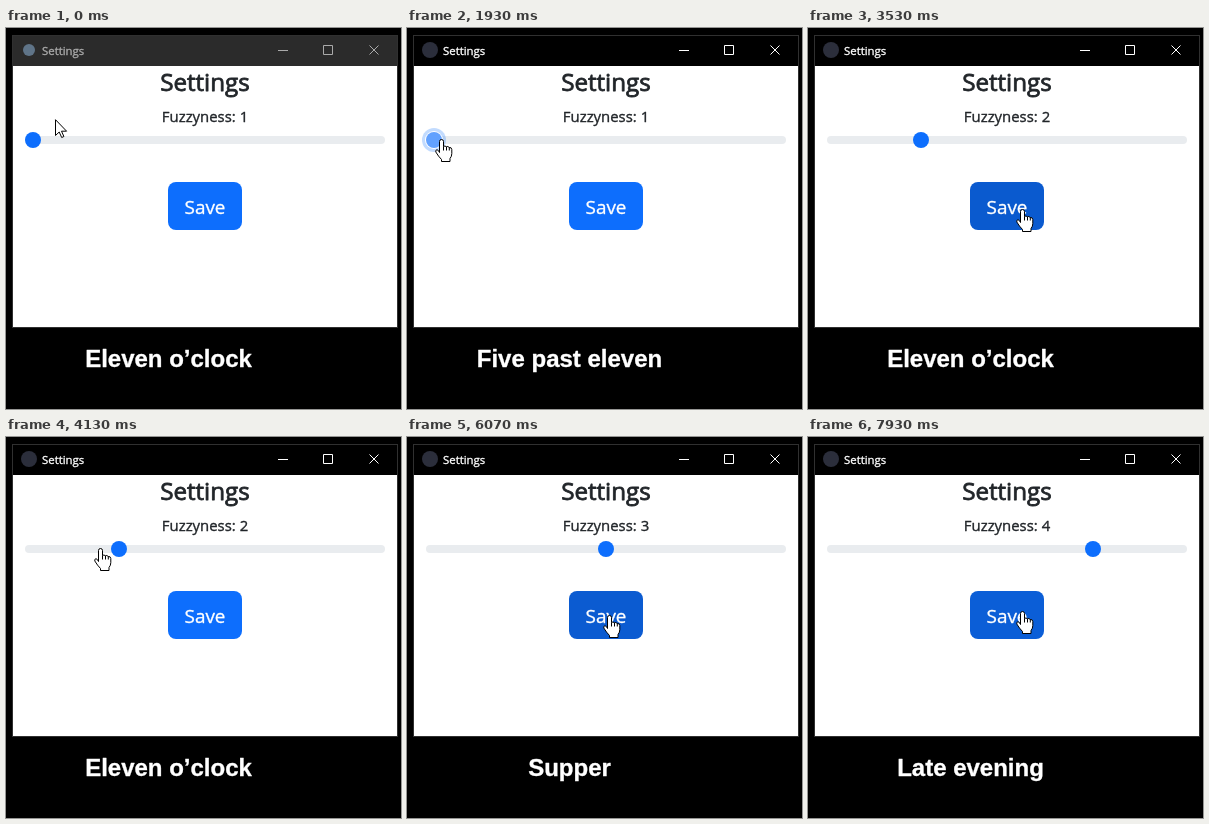
Write an HTML page with a canvas that moves like this. It is 395x381 px and loops after 8000 ms.

```html
<!DOCTYPE html>
<html lang="en">
<head>
<meta charset="utf-8">
<title>Settings</title>
<style>
html, body { margin: 0; width: 100%; height: 100%; overflow: hidden; background: #000; }
canvas { display: block; }
</style>
</head>
<body>
<canvas width="395" height="381"></canvas>
<script>
const ctx = document.querySelector('canvas').getContext('2d');
const LOOP = 8000, FPS = 15, FADE = 150, PRESS = 100;
const UI = '"Open Sans", "Noto Sans", sans-serif';
const CLOCK = '"Liberation Sans", Arial, sans-serif';
const BLUE = [13, 110, 253], HOVER = [11, 94, 215], PRESSED = [10, 88, 202], HELD = [182, 212, 254];

// Each round drags the thumb one level up, then clicks Save for a new phrase.
const rounds = [
  { start: 1870, from: [34, 111], drop: 2660, to: [94, 116], release: 2870,
    save: 3400, at: [214, 181], click: 3500, phrase: 'Eleven o’clock' },
  { start: 4200, from: [94, 111], drop: 5080, to: [161, 111], release: 5230,
    save: 5660, at: [202, 178], click: 6000, phrase: 'Supper' },
  { start: 6700, from: [199, 112], drop: 7100, to: [252, 112], release: 7130,
    save: 7500, at: [214, 174], click: 7700, phrase: 'Late evening' }
];

const smooth = u => u * u * (3 - 2 * u);
const speedUp = u => u * u;
const key = (t, [x, y], ease = smooth) => ({ t, x, y, ease });
const path = [
  key(0, [49, 91]), key(330, [11, 104]), key(870, [125, 146]), key(1270, [48, 108]),
  ...rounds.flatMap(r => [
    key(r.start - 70, r.from), key(r.start, r.from),
    key(r.drop, r.to, speedUp), key(r.release, r.to),
    key(r.save, r.at), key(r.click + 150, r.at)
  ])
];

function pointerAt(t) {
  const i = path.findIndex(p => p.t > t);
  if (i < 1) return i ? path[path.length - 1] : path[0];
  const a = path[i - 1], b = path[i], k = b.ease((t - a.t) / (b.t - a.t));
  return { x: Math.round(a.x + (b.x - a.x) * k), y: Math.round(a.y + (b.y - a.y) * k) };
}

const thumbX = level => 27 + 86 * (level - 1);
const levelAt = t => 1 + rounds.filter((r, i) =>
  t >= r.drop || t >= r.start && pointerAt(t).x > thumbX(i + 1) + 43).length;
const grabbed = (t, end) => rounds.some((r, i) =>
  t >= r.start && t < end(r) && pointerAt(t).x > thumbX(i + 1) - 8);
const isHeld = t => grabbed(t, r => r.release);
const isFocused = t => grabbed(t, r => r.click - PRESS);
const isPressed = t => rounds.some(r => t >= r.click - PRESS && t < r.click);

const inside = (p, x, y, w, h) => p.x >= x && p.x < x + w && p.y >= y && p.y < y + h;
const SAVE = [162, 154, 74, 48], TRACK = [19, 108, 360, 8];
const onSave = t => inside(pointerAt(t), ...SAVE);

function phraseAt(t) {
  const done = rounds.filter(r => t >= r.click).pop();
  return done ? done.phrase : t < 460 ? 'Eleven o’clock' : 'Five past eleven';
}

// Share of the last moments in which a state held: a linear colour transition
function fade(state, t) {
  const samples = 10;
  let sum = 0;
  for (let i = 0; i < samples; i++) sum += state(t - i * FADE / samples);
  return sum / samples;
}
const mix = (a, b, k) => a.map((v, i) => Math.round(v + (b[i] - v) * k));
const rgb = c => `rgb(${c})`;

function box(x, y, w, h, fill, r = 0) {
  ctx.fillStyle = fill;
  ctx.beginPath();
  ctx.roundRect(x, y, w, h, r);
  ctx.fill();
}
const disc = (x, y, r, fill) => box(x - r, y - r, 2 * r, 2 * r, fill, r);

function text(str, x, y, font, fill, align = 'center', extra = 0.35) {
  ctx.font = font;
  ctx.fillStyle = ctx.strokeStyle = fill;
  ctx.textAlign = align;
  ctx.lineWidth = extra;
  ctx.lineJoin = 'round';
  ctx.fillText(str, x, y);
  ctx.strokeText(str, x, y);
}

const arrow = new Path2D('M.5 .7V16.5L4.2 13L6.7 18.5L8.9 17.5L6.5 12.2H11.6Z');
const hand = new Path2D('M4.5 13.5V2.5Q4.5 .5 6.5 .5T8.5 2.5V7.5Q10 6.3 11.4 7.8Q13 6.8 14.2 8.5' +
  'Q16.6 8.1 16.8 10.5V14.5Q16.8 17.5 15 19.5V22.5H6.5V20.5Q3.5 17.5 .8 13Q.3 11 2 10.7Q3.5 11 4.5 13.5Z');
const knuckles = new Path2D('M8.5 7.5V11.5M11.5 7.8V11.5M14.3 8.5V11.5');
const controls = new Path2D('M272 22.5H282M317.5 17.5H326.5V26.5H317.5Z' +
  'M363.5 17.5L372.5 26.5M372.5 17.5L363.5 26.5');

function stroke(shape, color) {
  ctx.strokeStyle = color;
  ctx.lineWidth = 1;
  ctx.lineJoin = 'miter';
  ctx.stroke(shape);
}

function drawPointer({ x, y }, isHand) {
  const shape = isHand ? hand : arrow;
  ctx.save();
  ctx.translate(isHand ? x - 6 : x, y);
  ctx.fillStyle = '#fff';
  ctx.fill(shape);
  stroke(shape, '#000');
  if (isHand) stroke(knuckles, '#000');
  ctx.restore();
}

function drawWindow(active) {
  const ink = active ? '#fff' : '#aaa';
  box(0, 0, 395, 381, '#000');
  box(6, 7, 386, 293, '#303030');
  box(7, 8, 384, 30, active ? '#000' : '#2b2b2b');
  box(7, 38, 384, 261, '#fff');
  disc(23, 22, active ? 8 : 6, active ? '#2b2e3b' : '#5f7488');
  text('Settings', 36, 27, '11.4px ' + UI, ink, 'left');
  stroke(controls, ink);
}

function draw(t) {
  const ink = '#212529', level = levelAt(t), thumb = thumbX(level), p = pointerAt(t);

  drawWindow(t >= rounds[0].start);
  text('Settings', 199, 63, '500 24.2px ' + UI, ink, 'center', 0.8);
  text('Fuzzyness: ' + level, 199, 94, '14.9px ' + UI, ink);

  box(...TRACK, '#e9ecef', 4);
  if (isFocused(t)) {
    disc(thumb, 112, 12, 'rgba(13,110,253,.25)');
    disc(thumb, 112, 9, '#fff');
  }
  disc(thumb, 112, 8, rgb(mix(BLUE, HELD, fade(isHeld, t))));

  const hovered = mix(BLUE, HOVER, fade(onSave, t));
  box(...SAVE, rgb(mix(hovered, PRESSED, fade(isPressed, t))), 8);
  text('Save', 199, 186, '18.9px ' + UI, '#fff');
  text(phraseAt(t), 162.5, 339, 'bold 24px ' + CLOCK, '#fff');

  const onThumb = Math.hypot(p.x - thumb, p.y - 112) < 8;
  drawPointer(p, isHeld(t) || onThumb || onSave(t) || inside(p, ...TRACK));
}

function tick() {
  const t = performance.now() % LOOP;
  const step = Math.floor(t * FPS / 1000 + 0.06);
  draw(step * 1000 / FPS % LOOP);
  requestAnimationFrame(tick);
}
tick();
</script>
</body>
</html>
```
